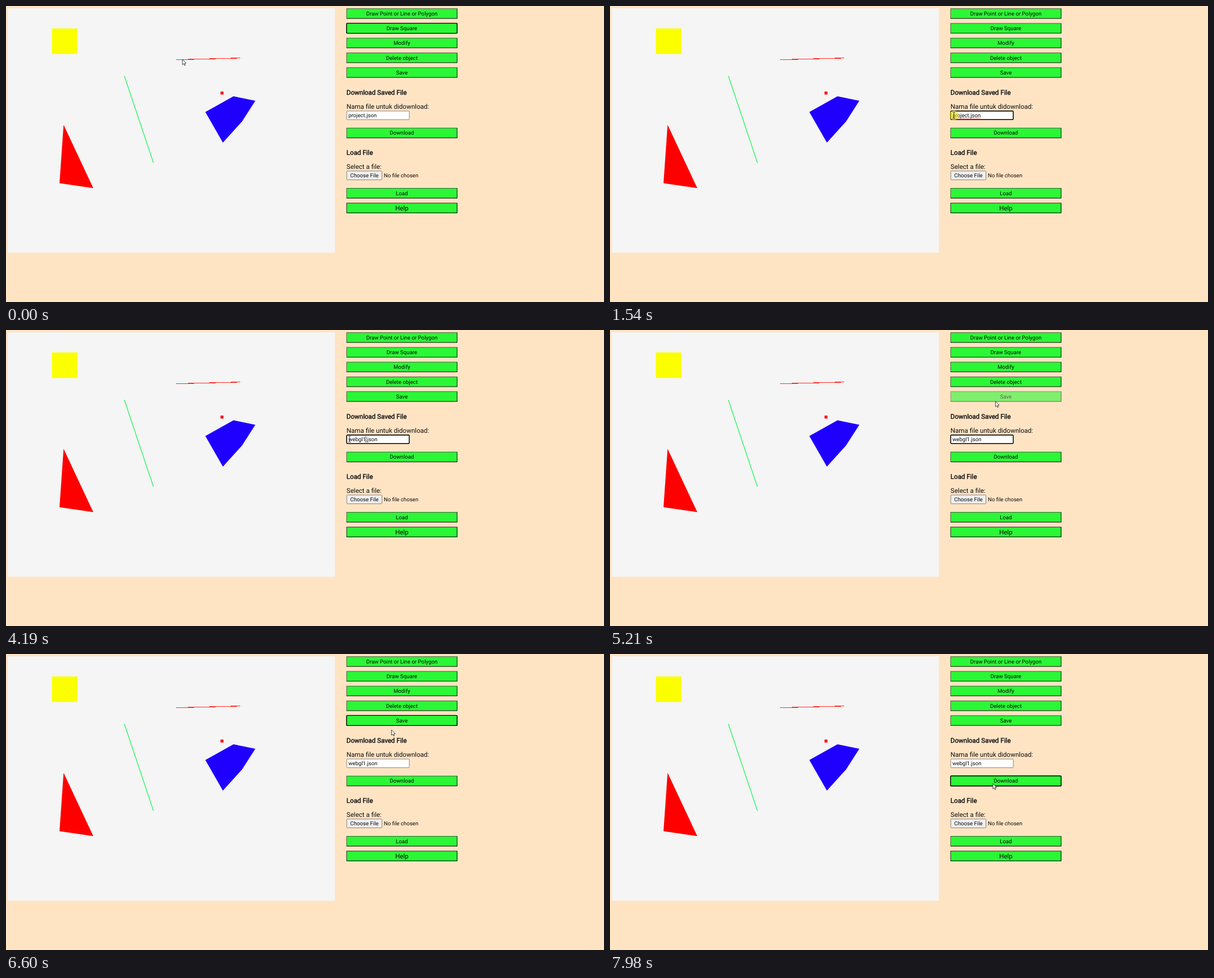
Write an HTML page that moves like this. It is 1062x527 px and loops after 8 s.

```html
<!DOCTYPE html>
<html lang="id">
<head>
<meta charset="utf-8">
<title>Shape editor</title>
<style>
  html, body { margin: 0; width: 100%; height: 100%; overflow: hidden; background: #ffe4c4; }
  svg { display: block; width: 100%; height: 100%; }
  text { font: 9.67px Roboto, sans-serif; fill: #0c0c0c; text-rendering: geometricPrecision; white-space: pre; }
  .mid { text-anchor: middle; }
  .big { font-size: 11.6px; }
  .head { stroke: #0c0c0c; stroke-width: .4px; }
  .ring { fill: #2bf736; stroke: #000; stroke-width: 1.4px; }
  .hover { opacity: .6; }
</style>
</head>
<body>
<svg viewBox="0 0 1062 527" xmlns="http://www.w3.org/2000/svg">
  <rect x="3.3" y="4" width="580.7" height="435.2" fill="#f5f5f5"/>
  <rect x="81.5" y="40" width="45.6" height="45.4" fill="#fbff00"/>
  <path d="M302.5 95.7L415.7 92.7" stroke="#ff2a22" stroke-width="1.3" shape-rendering="crispEdges"/>
  <path d="M210.2 124.5L261.8 279" stroke="#2df562" stroke-width="1.4"/>
  <rect x="381" y="152.4" width="5.2" height="5.2" fill="#f00"/>
  <path d="M354 188.8L404 160.8L442.8 168.8L419.3 205.6L385.2 243.3Z" fill="#1f00ff"/>
  <path d="M102.3 211.5L95 315.4L155 324.3Z" fill="#f00"/>

  <g id="buttons"></g>

  <text class="big head" x="604.8" y="158">Download Saved File</text>
  <text class="big" x="604.8" y="183.3">Nama file untuk didownload:</text>
  <text class="big head" x="604.8" y="265.4">Load File</text>
  <text class="big" x="604.8" y="290.4">Select a file:</text>

  <rect id="box" x="605.2" y="187" width="111" height="15.4" rx="1" fill="#fff" stroke-width=".9"/>
  <rect id="boxRing" class="ring" x="605" y="187" width="111.2" height="15.2" rx="1.6" style="fill:none"/>
  <rect id="pick" x="608" y="189" width="29.9" height="11.4" fill="#0078d7"/>
  <path id="squiggle" d="M608 199.7H658" stroke="#f33" stroke-width=".9" stroke-dasharray="1.5 .6"/>
  <text id="field" x="608" y="197.9"><tspan id="stem"></tspan><tspan>.json</tspan></text>
  <rect id="caret" y="189" width=".9" height="11.2"/>

  <rect x="605.2" y="293.8" width="62.5" height="15.6" rx="1" fill="#efefef" stroke="#767676" stroke-width=".9"/>
  <text class="mid" x="636.5" y="304.8">Choose File</text>
  <text x="671" y="304.8">No file chosen</text>

  <circle id="press" r="8.6" fill="#f0e600" fill-opacity=".55"/>
  <path id="arrow" d="M0 0V9.4L2.2 7.5L3.7 10.9L5.2 10.2L3.8 6.9H6.7Z" fill="#fff" stroke="#1b2733" stroke-width=".85"/>
  <path id="beam" d="M-2.2 -5.2H-.6L0 -4.7L.6 -5.2H2.2M0 -4.7V4.7M-2.2 5.2H-.6L0 4.7L.6 5.2H2.2" fill="none" stroke="#222" stroke-width=".9"/>
</svg>
<script>
const LOOP = 8000;
const $ = id => document.getElementById(id);

function button(id, y, label, big) {
  const x = 604.5, w = 197, h = 18.4;
  $('buttons').insertAdjacentHTML('beforeend', `
    <g id="${id}">
      <rect x="${x}" y="${y}" width="${w}" height="${h}" fill="${big ? '#1c2a1a' : '#4a5a40'}"/>
      <path d="M${x} ${y + h}H${x + w}V${y}l-1 1V${y + h - 1}H${x + 1}Z" fill="#0a1408"/>
      <rect x="${x + 1}" y="${y + 1}" width="${w - 2}" height="${h - 2}" fill="#2bf736"/>
      <rect class="ring" x="${x + .3}" y="${y + .2}" width="${w - .6}" height="${h - .4}" rx="1.8" visibility="hidden"/>
      <text class="mid ${big ? 'big' : ''}" x="703" y="${y + (big ? 13.4 : 12.6)}">${label}</text>
    </g>`);
}
['Draw Point or Line or Polygon', 'Draw Square', 'Modify', 'Delete object', 'Save']
  .forEach((label, i) => button('b' + i, 4.2 + 26.25 * i, label));
button('download', 216.8, 'Download');
button('load', 324, 'Load');
button('help', 350.4, 'Help', true);

const smooth = p => p * p * (3 - 2 * p);
const easeOut = power => p => 1 - (1 - p) ** power;

// Pointer moves, each made of equally spaced jumps.
const moves = [
  { at: 0, to: [313.3, 95] },
  { at: 210, to: [321.3, 95] },
  { at: 580, span: 640, jumps: 10, to: [610.8, 194.7] },
  { at: 2080, to: [610.1, 194.3] },
  { at: 4890, span: 470, jumps: 7, to: [685.1, 124], ease: [easeOut(4), easeOut(2.5)] },
  { at: 6520, span: 700, jumps: 10, to: [680, 230.7] }
];

function pointer(t) {
  const i = moves.findLastIndex(m => m.at <= t);
  const { at, span = 1, jumps = 1, to, ease = [smooth, smooth] } = moves[i];
  const from = i ? moves[i - 1].to : to;
  const jump = Math.floor((t - at) / span * (jumps - 1) + 1.02);
  const p = Math.min(1, jump / jumps);
  return to.map((end, axis) => from[axis] + (end - from[axis]) * ease[axis](p));
}

const name = 'webgl1';
const keyTimes = [2540, 2860, 3010, 3710, 3880, 4190];
function typed(t) {
  const n = keyTimes.filter(k => k <= t).length;
  return n ? name.slice(0, n) : 'project';
}

const within = (t, a, b) => t >= a && t < b;
const show = (el, on) => el.setAttribute('visibility', on ? 'visible' : 'hidden');
const place = (el, x, y) => el.setAttribute('transform', `translate(${x} ${y})`);

const rings = [['b1', 0, 1540], ['b4', 6000, 7750], ['download', 7750, LOOP]]
  .map(([id, a, b]) => [$(id).querySelector('.ring'), a, b]);

function draw(t) {
  const [x, y] = pointer(t);
  const inBox = within(x, 605, 716.5) && within(y, 187, 202.5);
  const overText = within(x, 605, 712) && (within(y, 147, 161) || within(y, 173, 187));
  const beam = inBox || overText;
  place($('arrow'), x, y);
  place($('beam'), x, y);
  show($('arrow'), !beam);
  show($('beam'), beam);

  place($('press'), x, y);
  show($('press'), within(t, 1540, 1850) || within(t, 6000, 6140) || within(t, 7750, 7980));

  for (const [ring, a, b] of rings) show(ring, within(t, a, b));
  $('b4').classList.toggle('hover', within(x, 605, 801) && within(y, 109, 127.6));

  $('box').setAttribute('stroke', inBox ? '#4f4f4f' : '#767676');
  show($('boxRing'), within(t, 1540, 6000));
  show($('squiggle'), within(t, 1540, 2540));

  const picked = within(t, 1770, 2540);
  const stem = typed(t);
  if ($('stem').textContent !== stem) $('stem').textContent = stem;
  $('stem').style.fill = picked ? '#fff' : '';
  show($('pick'), picked);

  const lit = within(t, 2540, 3560) || within(t, 3710, 4720) || within(t, 5280, 5740);
  show($('caret'), lit);
  if (lit) $('caret').setAttribute('x', 607.7 + $('field').getSubStringLength(0, stem.length));
}

function tick() {
  draw(performance.now() % LOOP);
  requestAnimationFrame(tick);
}
tick();
</script>
</body>
</html>
```
